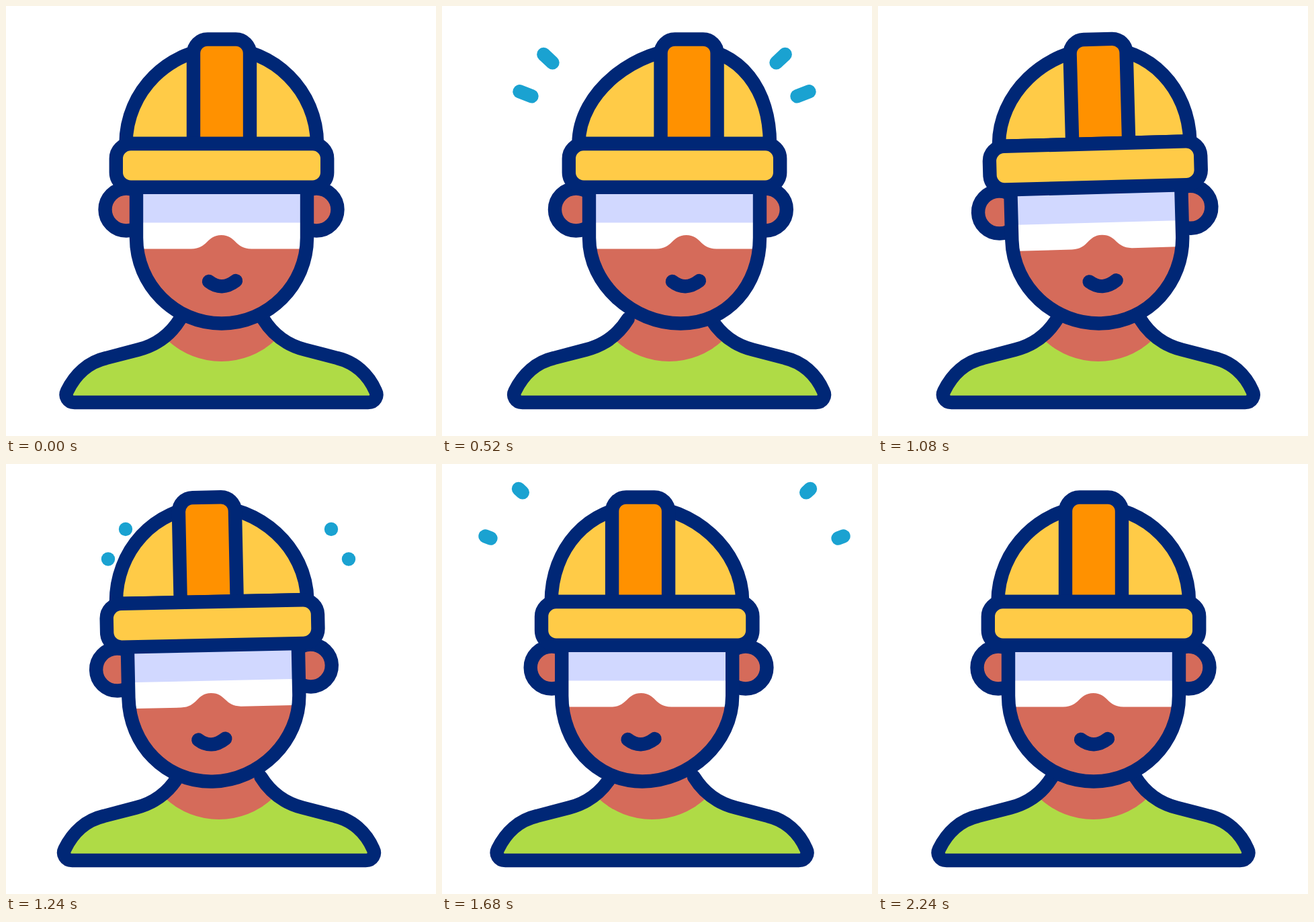
Write an HTML page that moves like this. It is 640x640 px and loops after 2560 ms.

```html
<!DOCTYPE html>
<html lang="en">
<head>
<meta charset="utf-8">
<title>Worker turning head</title>
<style>
  html, body { margin: 0; width: 100%; height: 100%; overflow: hidden; background: #fff; }
  svg { display: block; width: 100vw; height: 100vh; }
  .line { stroke: #002776; stroke-width: 20.4; stroke-linecap: round; stroke-linejoin: round; }
  .none { fill: none; }
  .skin { fill: #d56b5a; }
  .yellow { fill: #ffcb47; }
  .orange { fill: #ff9100; }
  .green { fill: #afdb46; }
  .white { fill: #fff; }
  .lens { fill: #d1d8ff; }
  .spark { stroke: #1aa2d1; stroke-width: 20.4; stroke-linecap: round; }
</style>
</head>
<body>
<svg viewBox="0 0 640 640">
  <g id="sparks"></g>
  <g id="body">
    <path class="green" d="M102 590C92 590 87 581 91 573C103 548 123 530 149 524L197 511.500C226 504 246 487 259 466H383C396 487 416 504 445 511.500L493 524C519 530 539 548 550 573C554 581 549 590 539 590Z"/>
    <path class="skin" d="M241 498A117.400 117.400 0 0 0 400 498L383 460H259Z"/>
    <path class="line none" d="M259 466C246 487 226 504 197 511.500L149 524C123 530 103 548 91 573C87 581 92 590 102 590H539C549 590 554 581 550 573C539 548 519 530 493 524L445 511.500C416 504 396 487 383 466"/>
  </g>
  <g id="head">
    <circle id="earL" class="line skin" cx="179" cy="303" r="31.500"/>
    <circle id="earR" class="line skin" cx="462" cy="303" r="31.500"/>
    <path id="skin" class="skin"/>
    <path id="visor" class="white"/>
    <rect id="lens" class="lens" x="194" y="270" width="254" height="52.500"/>
    <path id="face" class="line none"/>
    <path id="mouth" class="line none" d="M302 410Q321 425 342 409"/>
    <path id="dome" class="line yellow"/>
    <path id="stripe" class="line orange" d="M279 205V70.500A21 21 0 0 1 300 49.500H342A21 21 0 0 1 363 70.500V205Z"/>
    <rect id="brim" class="line yellow" x="163.800" y="205" width="314.400" height="64.700" rx="22"/>
  </g>
</svg>
<script>
const LOOP = 2560, STEP = 40, BURST_GAP = 880;
const $ = id => document.getElementById(id);

// Horizontal shift of each part when turned right and left.
const shifts = {
  body: [15.5, -9], head: [22, -18], earL: [18, -18], earR: [17, -11.5],
  stripe: [41, -29.5], nose: [38, -27.5], mouth: [36, -29], chin: [30, -26]
};

// Rows of [time, value], eased between neighbours.
const right = [[0, 0], [480, 1.14], [880, .99], [1400, 0]];
const left = [[880, 0], [1400, 1], [1760, .86], [2240, 0]];
const tilt = [[0, 0], [240, 1.65], [480, 0], [880, 0], [1140, -1.8], [1400, 0]];
const tip = [[360, 0], [720, 1]];
const tail = [[360, 0], [900, 1]];

// Inner and outer ends of the two left sparks; the others are mirrored.
const rays = [[152, 141.5, 64.5, 107.5], [178, 97, 114, 37]];
const MIRROR = 662;

function at(keys, t) {
  if (t <= keys[0][0]) return keys[0][1];
  for (let i = 1; i < keys.length; i++) {
    const [t0, a] = keys[i - 1], [t1, b] = keys[i];
    if (t < t1) {
      const u = (t - t0) / (t1 - t0);
      return a + (b - a) * u * u * (3 - 2 * u);
    }
  }
  return keys[keys.length - 1][1];
}

const sparks = rays.flatMap(ray => [false, true].map(flip => {
  const el = document.createElementNS("http://www.w3.org/2000/svg", "line");
  el.setAttribute("class", "spark");
  $("sparks").append(el);
  return { el, ray, flip };
}));

const move = (id, x) => $(id).setAttribute("transform", `translate(${x} 0)`);
const shape = (id, d) => $(id).setAttribute("d", d);

function drawSparks(t) {
  const time = t < 1200 ? t : t - BURST_GAP;
  const shown = time >= 360 && time < 880;
  $("sparks").setAttribute("visibility", shown ? "visible" : "hidden");
  if (!shown) return;
  const ends = [at(tail, time), at(tip, time)];
  for (const { el, ray: [x0, y0, x1, y1], flip } of sparks) {
    ends.forEach((u, i) => {
      const x = x0 + (x1 - x0) * u;
      el.setAttribute("x" + (i + 1), flip ? MIRROR - x : x);
      el.setAttribute("y" + (i + 1), y0 + (y1 - y0) * u);
    });
  }
}

function draw(t) {
  const r = at(right, t), l = at(left, t), p = {};
  for (const k in shifts) p[k] = shifts[k][0] * r + shifts[k][1] * l;

  for (const id of ["body", "earL", "earR", "mouth", "stripe"]) move(id, p[id]);
  move("brim", p.head);
  move("lens", p.head);

  const h = p.head, c = 321 + p.chin, n = 320.5 + p.nose, s = 321 + p.stripe;
  const jaw = `M${194 + h} 270V345C${194 + h} 415 ${c - 70} 472.500 ${c} 472.500` +
    `S${448 + h} 415 ${448 + h} 345V270`;
  shape("skin", jaw + "Z");
  shape("face", jaw);
  shape("visor", `M${194 + h} 270V361.500H${n - 45}C${n - 20} 361.500 ${n - 22} 341 ${n} 341` +
    `S${n + 20} 361.500 ${n + 45} 361.500H${448 + h}V270Z`);
  shape("dome", `M${178.5 + h} 205C${178.5 + h} 127 ${s - 78} 63 ${s} 63` +
    `S${463 + h} 127 ${463 + h} 205Z`);

  $("head").setAttribute("transform", `rotate(${at(tilt, t)} ${321 + h} 470)`);
  drawSparks(t);
}

const start = performance.now();
function tick() {
  const t = Math.max(0, performance.now() - start) % LOOP;
  draw(Math.floor(t / STEP) * STEP);
  requestAnimationFrame(tick);
}
tick();
</script>
</body>
</html>
```
